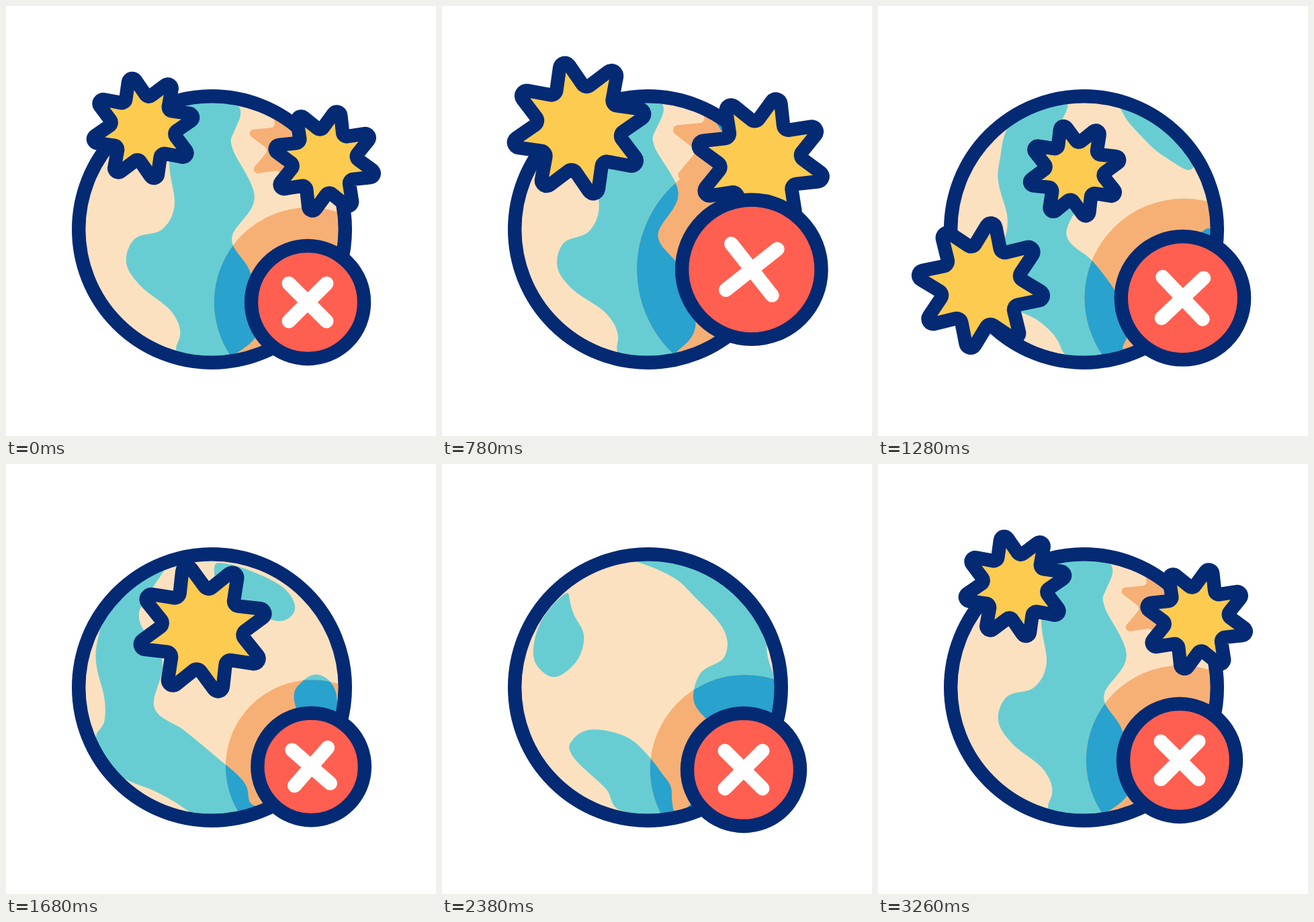
An HTML page for the animation above (3.6 s loop, 640 px wide and 640 px high).

```html
<!DOCTYPE html>
<html lang="en">
<head>
<meta charset="utf-8">
<title>Globe</title>
<style>
html, body { margin: 0; width: 100%; height: 100%; overflow: hidden; background: #fff; }
svg { display: block; width: 100vw; height: 100vh; }
.line { stroke: #042a74; stroke-width: 20.4; stroke-linejoin: round; }
</style>
</head>
<body>
<svg viewBox="0 0 640 640">
  <defs>
    <clipPath id="disc"><circle cx="306.5" cy="332.5" r="198"/></clipPath>
    <clipPath id="shade"><circle id="halo"/><path id="starShade"/></clipPath>
    <path id="sea"/>
  </defs>
  <g clip-path="url(#disc)">
    <rect width="640" height="640" fill="#fce1c0"/>
    <use href="#sea" fill="#68cdd2"/>
    <g clip-path="url(#shade)">
      <rect width="640" height="640" fill="#f6b075"/>
      <use href="#sea" fill="#29a2ce"/>
    </g>
  </g>
  <circle class="line" cx="306.5" cy="332.5" r="198.3" fill="none"/>
  <g id="stars"></g>
  <circle id="badge" class="line" fill="#ff5f50"/>
  <path id="cross" fill="none" stroke="#fff" stroke-width="21" stroke-linecap="round"/>
</svg>
<script>
const LOOP = 3600, SPIN_START = 120, SPIN_END = 3260;
const GLOBE = { x: 306.5, y: 332.5, r: 198 };

const $ = id => document.getElementById(id);
const rad = deg => deg * Math.PI / 180;
const clamp = u => Math.max(0, Math.min(1, u));
const fix = n => n.toFixed(2);
const phase = (t, from, length) => clamp((t - from) / length);
const hump = u => Math.sin(Math.PI * u) ** 2;

function set(el, attrs) {
  for (const name in attrs) el.setAttribute(name, attrs[name]);
}

// Cubic bezier easing whose handles lie at heights 0 and 1.
function bezierEase(u, x1, x2) {
  let lo = 0, hi = 1;
  for (let i = 0; i < 30; i++) {
    const s = (lo + hi) / 2, r = 1 - s;
    if (3 * r * r * s * x1 + 3 * r * s * s * x2 + s ** 3 < u) lo = s; else hi = s;
  }
  return lo * lo * (3 - 2 * lo);
}

// Rises from 0, overshoots to 1.31 and settles at 1.
function popEase(u) {
  const v = 1 - u;
  return 1 + 3.5 * v * v - 4.5 * v ** 3;
}

// Outlines of the seas as [longitude, latitude]; south is positive.
const seas = [
  { centre: -10, outline: [
    [-40, -84], [-36, -70], [-24, -45], [-21.6, -29.5], [-16.6, -11], [-22, 0], [-35.5, 4],
    [-41.7, 14.5], [-36.5, 25], [-22.5, 38.6], [-24, 53.7], [-48, 71], [-55, 84],
    [30, 84], [30, 70], [34, 55], [25, 34], [17, 17.5], [8.6, 3.6], [19.3, -14], [11.2, -37.5],
    [14.7, -48], [33, -69], [36, -84]] },
  { centre: 80, outline: [
    [62, -45], [62, -28], [70, -18], [80, -13], [92, -17], [97, -27], [92, -38], [78, -56]] },
  { centre: 92, outline: [
    [72, 21], [78, 15], [88, 13.5], [99, 18], [107, 26], [113, 43], [114, 58], [95, 78], [60, 60], [75, 43]] }
];

// Closed smooth curve through the points, sampled finely.
function smooth(points, steps = 8) {
  const n = points.length, out = [];
  for (let i = 0; i < n; i++) {
    const [a, b, c, d] = [-1, 0, 1, 2].map(k => points[(i + k + n) % n]);
    for (let s = 0; s < steps; s++) {
      const u = s / steps;
      out.push([0, 1].map(k => b[k] + u / 2 * (c[k] - a[k]
        + u * (2 * a[k] - 5 * b[k] + 4 * c[k] - d[k] + u * (3 * (b[k] - c[k]) + d[k] - a[k])))));
    }
  }
  return out;
}
for (const sea of seas) sea.outline = smooth(sea.outline);

// Places a spot on the turned, tilted and rolled globe; hidden spots go just past the rim.
function project(lon, lat, tilt, roll) {
  const a = rad(lon), b = rad(lat);
  const x = Math.cos(b) * Math.sin(a), y0 = Math.sin(b), z0 = Math.cos(b) * Math.cos(a);
  const y = y0 * Math.cos(tilt) - z0 * Math.sin(tilt);
  const z = z0 * Math.cos(tilt) + y0 * Math.sin(tilt);
  const r = GLOBE.r * (z < 0 ? 1.15 / Math.hypot(x, y) : 1);
  return [
    fix(GLOBE.x + r * (x * Math.cos(roll) + y * Math.sin(roll))),
    fix(GLOBE.y + r * (y * Math.cos(roll) - x * Math.sin(roll)))
  ];
}

function seaPath(t) {
  const u = phase(t, SPIN_START, SPIN_END - SPIN_START);
  const spin = 180 * bezierEase(u, .844, .589);
  const sway = hump(u ** 1.25);
  let d = '';
  for (const { centre, outline } of seas) {
    for (const turn of [-spin, 180 - spin]) {
      if (Math.abs(centre + turn) > 125) continue;
      const spots = outline.map(([lon, lat]) => project(lon + turn, lat, rad(5 * sway), rad(22 * sway)));
      d += `M${spots.join('L')}Z`;
    }
  }
  return d;
}

// leave/shrink: start and length of vanishing; born/grow/fade: of appearing.
const stars = [
  { x: 204, y: 182, turn: -13.3, leave: 400, shrink: 780, born: 2453, grow: 495, fade: 60 },
  { x: 474.2, y: 231, turn: 15, leave: 540, shrink: 640, born: 2488, grow: 510, fade: 220 },
  { x: 153, y: 416, turn: 10, born: 1090, grow: 296, fade: 50, leave: 1390, shrink: 280 },
  { x: 292.6, y: 245.6, turn: -15, born: 1224, grow: 300, fade: 50, leave: 1566, shrink: 300 }
];

function starState(star, t) {
  const { born, grow, fade, leave, shrink } = star;
  const growing = t >= born && (leave > born ? t < leave : true);
  if (growing) return [Math.max(0, popEase(phase(t, born, grow))), phase(t, born, fade)];
  if (leave > born && t < born) return [0, 0];
  const left = 1 - phase(t, leave, shrink);
  return [Math.max(0, popEase(left)), clamp(left * 5)];
}

// Eight-pointed star with rounded tips and dips.
function starPath(x, y, scale, turn) {
  const r = 6 * scale, tipR = 70, dipR = 54;
  const polar = (cx, cy, radius, deg) =>
    [cx + radius * Math.cos(rad(deg)), cy + radius * Math.sin(rad(deg))];
  const [dx, dy] = polar(-tipR, 0, dipR, 22.5);
  const contact = (Math.atan2(dy, dx) - Math.acos(12 / Math.hypot(dx, dy))) * 180 / Math.PI;
  let d = '';
  for (let a = turn; a < turn + 359; a += 45) {
    const tip = polar(x, y, tipR * scale, a);
    const dip = polar(x, y, dipR * scale, a + 22.5);
    const on = (centre, deg) => polar(...centre, r, deg).map(fix);
    d += `${d ? 'L' : 'M'}${on(tip, a - contact)}A${fix(r)} ${fix(r)} 0 0 1 ${on(tip, a + contact)}`
      + `L${on(dip, a + contact + 180)}A${fix(r)} ${fix(r)} 0 0 0 ${on(dip, a + 225 - contact)}`;
  }
  return d + 'Z';
}

// The badge rests at one place; each nudge swells and fades as a hump.
const badgeRest = { x: 449, y: 441, scale: 1, turn: 0, halo: 1 };
const nudges = [
  { from: 180, to: 1480, x: 12, y: -49.5, scale: .238, turn: 6.7, halo: .226 },
  { from: 1200, to: 1700, x: 8, y: 18, scale: .17 },
  { from: 1500, to: 1860, x: 5, y: 9.2, scale: -.053, turn: -4, halo: -.085 },
  { from: 2050, to: 2850, y: 15 }
];

function badgeState(t) {
  const state = { ...badgeRest };
  for (const { from, to, ...change } of nudges) {
    const amount = hump(phase(t, from, to - from));
    for (const key in change) state[key] += change[key] * amount;
  }
  return state;
}

for (const star of stars) {
  star.el = document.createElementNS('http://www.w3.org/2000/svg', 'g');
  star.path = document.createElementNS('http://www.w3.org/2000/svg', 'path');
  set(star.path, { class: 'line', fill: '#fecb51' });
  star.el.append(star.path);
  $('stars').append(star.el);
}

function draw(t) {
  set($('sea'), { d: seaPath(t) });

  for (const star of stars) {
    const [scale, opacity] = starState(star, t);
    set(star.path, { d: starPath(star.x, star.y, scale, star.turn) });
    set(star.el, { opacity, visibility: opacity > 0 ? 'visible' : 'hidden' });
  }

  // The right star's shadow follows it, and returns a little later.
  const [starScale] = starState(stars[1], t);
  const shadeScale = starScale * (t < stars[1].born ? 1 : phase(t, 2660, 180));
  set($('starShade'), { d: starPath(436, 209, shadeScale, 16) });

  const { x, y, scale, turn, halo } = badgeState(t);
  const arm = 28 * scale;
  set($('halo'), { cx: x + 2, cy: y, r: 141.3 * halo });
  set($('badge'), { cx: x, cy: y, r: 84 * scale });
  set($('cross'), {
    d: `M${-arm},${-arm}L${arm},${arm}M${arm},${-arm}L${-arm},${arm}`,
    transform: `translate(${x} ${y}) rotate(${turn})`
  });
}

const start = performance.now();
function tick() {
  draw((performance.now() - start) % LOOP);
  requestAnimationFrame(tick);
}
draw(0);
requestAnimationFrame(tick);
</script>
</body>
</html>
```
